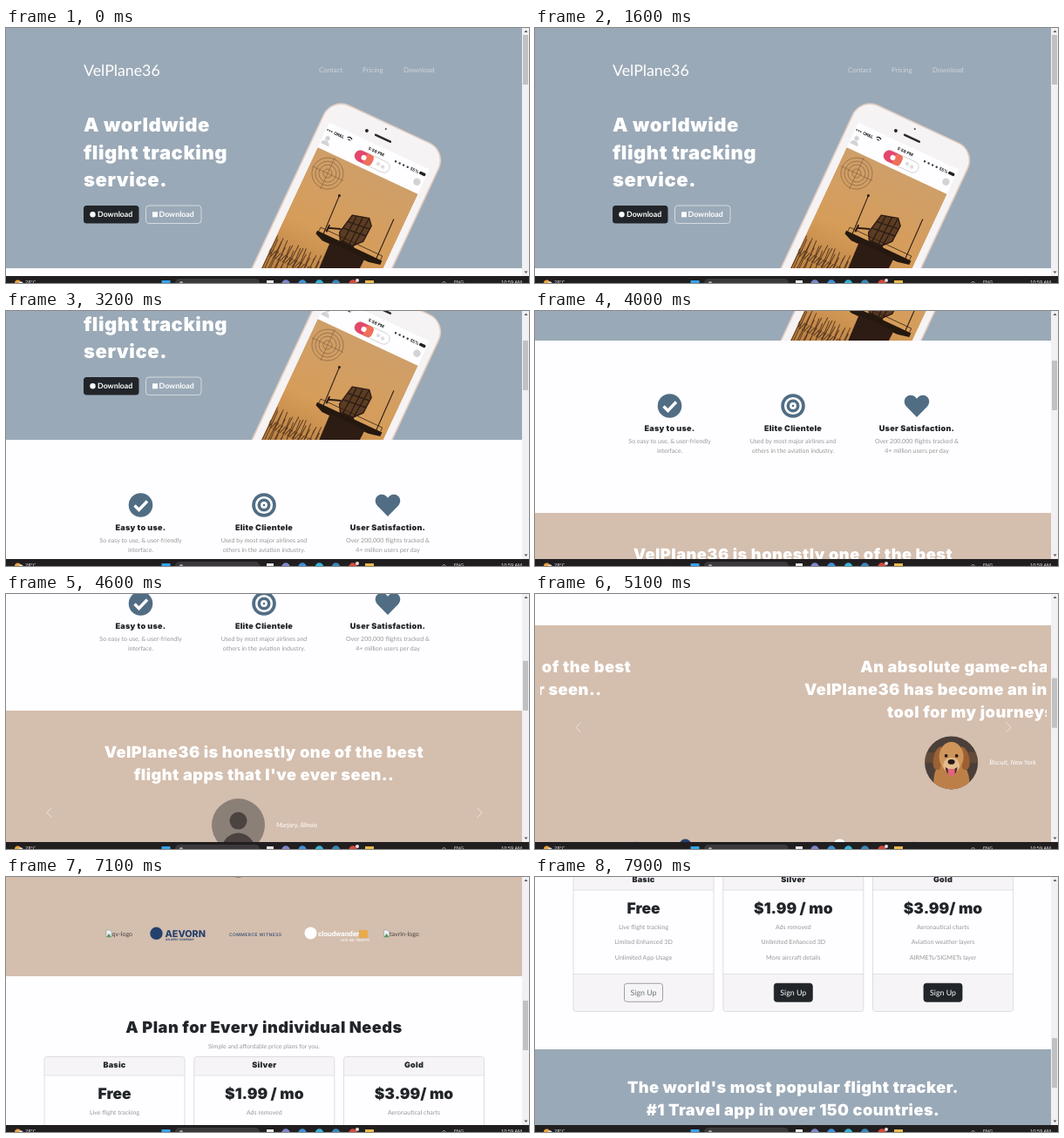
These frames come from a looping animation (600x293 px, 8 s). An HTML page:

```html
<!DOCTYPE html>
<html lang="en">
<head>
<meta charset="utf-8">
<title>Flight tracking landing page</title>
<style>
  html, body { margin: 0; width: 100%; height: 100%; overflow: hidden; background: #fefdff; }
  svg { display: block; width: 600px; height: 293px; text-rendering: geometricPrecision; }
  text { font: 7.1px Lato, sans-serif; }
  .m { text-anchor: middle; }
  .black { font-family: Inter, sans-serif; font-weight: 900; letter-spacing: .026em; }
  .hero { font-size: 22px; fill: #fff; }
  .big { font-size: 18.2px; }
  .price { font-size: 17.4px; letter-spacing: 0; }
  .sub { font-size: 9.1px; }
  .btn { font-size: 8.8px; }
  .bold { font-weight: 700; }
  .w { fill: #fff; }
  .ink { fill: #212529; }
  .grey { fill: #999; }
  .nav { font-size: 7.9px; fill: #fff; fill-opacity: .5; }
  .task { font: 5.5px "Open Sans", sans-serif; fill: #fff; }
  .status { font: 600 4.8px Inter, sans-serif; }
</style>
</head>
<body>
<svg id="stage" viewBox="0 0 600 293"></svg>
<script>
const BLUE = '#9aa9b7', BEIGE = '#d4beae', STEEL = '#516d84', NAVY = '#24406c', INK = '#212529', DARK = '#2c1c14';
const APP = 'VelPlane36';
const SLIDE_W = 580;

const text = (x, y, s, cls = '', extra = '') => `<text x="${x}" y="${y}" class="${cls}" ${extra}>${s}</text>`;
const rect = (x, y, w, h, fill, extra = '') => `<rect x="${x}" y="${y}" width="${w}" height="${h}" fill="${fill}" ${extra}/>`;
const dot = (x, y, r, fill, extra = '') => `<circle cx="${x}" cy="${y}" r="${r}" fill="${fill}" ${extra}/>`;
const path = (d, fill, extra = '') => `<path d="${d}" fill="${fill}" ${extra}/>`;
const line = (d, color, width = 1) => path(d, 'none', `stroke="${color}" stroke-width="${width}"`);
const lines = (x, y, step, list, cls) => list.map((s, i) => text(x, y + i * step, s, cls)).join('');

const defs = `<defs>
  <linearGradient id="dusk" x1="0" y1="0" x2="0" y2="1">
    <stop offset="0" stop-color="#cf9f69"/><stop offset=".5" stop-color="#d69d5a"/><stop offset="1" stop-color="#b3773a"/>
  </linearGradient>
  <clipPath id="photo"><rect x="382" y="-27" width="127" height="260"/></clipPath>
  <clipPath id="heroBox"><rect width="593" height="276"/></clipPath>
  <clipPath id="slides"><rect x="6" y="474" width="581" height="240"/></clipPath>
  <clipPath id="face"><circle r="30.5"/></clipPath>
</defs>`;

// The phone and its photo share one tilted coordinate system
function phone() {
  const body = rect(372.5, -85.5, 145.5, 330, '#f6f3f5', 'rx="22" stroke="#e2cdc1" stroke-width="1.6"')
    + rect(382, -58, 127, 32, '#fefdff')
    + dot(425, -68, 2, '#2a2a2c') + dot(444, -79, 1, '#444')
    + rect(435, -69.2, 21, 2.6, '#2a2a2c', 'rx="1.3"')
    + [384, 386.5, 389].map(x => dot(x, -50, .9, '#444')).join('')
    + text(392, -48.3, 'OR&amp;L', 'status')
    + line('M408 -51.5q3 -3 6 0M409.5 -49.5q1.5 -1.5 3 0', '#222', 1)
    + text(445, -49, '5:58 PM', 'status m')
    + [470, 475, 480, 485].map(x => dot(x, -50, 1.2, '#333')).join('')
    + text(488.5, -48.3, '55%', 'status')
    + rect(500, -51.8, 7.5, 3.4, '#222', 'rx="1"')
    + rect(424, -45, 43, 13, '#fff', 'rx="6.5" stroke="#ccc" stroke-width=".8"')
    + rect(424, -45, 22, 13, '#e4466c', 'rx="6.5"') + rect(436, -45, 10, 13, '#ef7059', 'rx="4"')
    + dot(435, -38.5, 3, '#fff')
    + dot(453, -39, 2.2, '#ddd') + dot(459, -38, 2.2, '#ddd')
    + dot(388, -41, 2.7, '#d3d3d5') + path('M383 -33a5 5 0 0 1 10 0z', '#d3d3d5')
    + dot(502, -39, 4.2, '#d3d3d5');

  const rings = [5, 10, 14, 18].map(r => dot(405, -4.5, r, 'none', 'stroke="#76573b" stroke-width=".7" stroke-opacity=".75"')).join('');
  const twigs = Array.from({ length: 22 }, (_, i) => {
    const x = 380 + i * 3, h = 46 + 10 * Math.abs(Math.sin(i * 1.9));
    return `M${x} 140l${3 * Math.sin(i * 3)} ${-h}M${x} 110l3 -9`;
  }).join('');
  const dish = 'M451 27l19 -5 6 7 -1 20 -9 10 -15 1 -5 -9z';
  const scene = rect(382, -27, 127, 170, 'url(#dusk)') + rings
    + line('M405 -24.5v40M385 -4.5h40', '#76573b', .5)
    + line(twigs, '#5b3c20', 1)
    + line('M428 13l2 48M496 11l1 50', DARK, 1.1) + dot(428, 13, 1.5, DARK)
    + line('M432 52l14 -5M432 48v9', DARK, 2)
    + path(dish, '#5b3c23')
    + line(dish + 'M449 36l27 -3M447 45l29 -3M456 26l-2 33M463 24l-1 35M470 23l-3 35', DARK, 1.4)
    + path('M453 58h14l5 6h-24z', DARK)
    + path('M422 60h82v5l-14 3h-58l-10 -4z', '#24180f')
    + line('M424 60v-5h78v5', DARK, .7)
    + path('M441 66h44l-3 80h-38z', DARK);
  return `<g clip-path="url(#heroBox)"><g transform="rotate(25)">${body}<g clip-path="url(#photo)">${scene}</g></g></g>`;
}

function hero() {
  return rect(0, 0, 593, 276, BLUE)
    + text(89, 54.5, APP, 'w', 'style="font-size:17.8px"')
    + text(359, 51, 'Contact', 'nav') + text(409, 51, 'Pricing', 'nav') + text(456, 51, 'Download', 'nav')
    + lines(89, 119, 31.5, ['A worldwide', 'flight tracking', 'service.'], 'black hero')
    + rect(89, 204, 63.5, 20.5, INK, 'rx="3.5"') + dot(99.5, 214.3, 3.2, '#fff')
    + text(105, 217.4, 'Download', 'w btn bold')
    + rect(160.5, 204, 63.5, 20.5, 'none', 'rx="3.5" stroke="#f4f6f8" stroke-width=".8" stroke-opacity=".8"') + rect(168, 211.3, 6, 6, '#fff')
    + text(175.5, 217.4, 'Download', 'w btn bold')
    + phone();
}

function features() {
  const items = [
    [154.5, 'Easy to use.', ['So easy to use, &amp; user-friendly', 'interface.']],
    [296, 'Elite Clientele', ['Used by most major airlines and', 'others in the aviation industry.']],
    [438, 'User Satisfaction.', ['Over 200,000 flights tracked &amp;', '4+ million users per day']]
  ];
  const ring = 'stroke="#fff" stroke-width="2.6"';
  return dot(154.5, 351, 13.8, STEEL) + line('M147.5 351.5l5 5 9.5 -10', '#fff', 3.4)
    + dot(296, 351, 13.8, STEEL) + dot(296, 351, 8.8, 'none', ring) + dot(296, 351, 2.6, 'none', ring)
    + path('M438 364l-12 -12.3c-5 -6 -1 -13 5 -13c3 0 5 1.5 7 4c2 -2.5 4 -4 7 -4c6 0 10 7 5 13z', STEEL)
    + items.map(([x, title, body]) => text(x, 380, title, 'black sub ink m') + lines(x, 394, 10.5, body, 'grey m')).join('');
}

function quote(id, rows, avatar, name) {
  const cy = 553 + 26.3 * rows.length;
  return `<g id="${id}">${lines(296, 527.5, 26.2, rows, 'black big w m')}
    <g transform="translate(266.5 ${cy})" clip-path="url(#face)">${avatar}</g>
    ${text(310, cy + 2, name, 'w', 'style="font-style:italic;font-size:7.5px"')}</g>`;
}

const person = dot(0, 0, 31, '#8b8078') + dot(0, -5, 10, '#4a4340') + path('M-20 31a20 22 0 0 1 40 0z', '#4a4340');
const dog = dot(0, 0, 31, '#4a4039') + rect(-31, -12, 62, 12, '#77503a', 'opacity=".6"')
  + path('M-20 31q-2 -24 8 -30h24q10 8 9 30z', '#bd7f48')
  + path('M-12 -19q-9 4 -9 21q2 9 8 5l5 -20zM12 -19q9 4 9 21q-2 9 -8 5l-5 -20z', '#9c6033')
  + '<ellipse cy="-7" rx="14" ry="17" fill="#cf965b"/><ellipse cy="3" rx="9.5" ry="9" fill="#e3bd8e"/>'
  + dot(-6, -8, 1.9, '#2a1b15') + dot(6, -8, 1.9, '#2a1b15')
  + '<ellipse cy="-1" rx="4" ry="2.8" fill="#241a18"/>'
  + path('M-7 5q7 5 14 0q-1 9 -7 9t-7 -9z', '#4a2522') + path('M-4 7h8v6q-4 6 -8 0z', '#e0667c');

const broken = (x, s) => path(`M${x} 723h4l2 2v6h-6z`, '#eef3f8', 'stroke="#8c98a5" stroke-width=".6"')
  + path(`M${x} 731l3 -4 3 4z`, '#5a9a55') + text(x + 6.5, 729.5, s, '', 'fill="#444"');

function testimonials() {
  return rect(0, 474, 593, 302, BEIGE)
    + '<g clip-path="url(#slides)">'
    + quote('first', [`${APP} is honestly one of the best`, "flight apps that I've ever seen.."], person, 'Marjory, Illinois')
    + quote('second', ['An absolute game-changer!', `${APP} has become an indispensable`, 'tool for my journeys..'], dog, 'Biscuit, New York')
    + '</g>'
    + line('M52.5 585.5l-5.5 5.7 5.5 5.7M540.5 585.5l5.5 5.7 -5.5 5.7', '#f1e8e1', .9)
    + broken(115, 'qv-logo') + broken(433.5, 'tavrin-logo')
    + dot(172.5, 726.8, 7.2, NAVY)
    + text(182.5, 730.5, 'AEVORN', '', `fill="${NAVY}" style="font:800 10.8px Inter,sans-serif"`)
    + text(183, 735, 'AN AERO COMPANY', '', `fill="${NAVY}" style="font:600 3.3px Inter,sans-serif"`)
    + text(256, 729.5, 'COMMERCE WITNESS', '', 'fill="#3f5a78" style="font:600 5px Inter,sans-serif;letter-spacing:.4px"')
    + dot(349.5, 726.5, 7, '#fff')
    + text(358, 730, 'cloudwander', 'w', 'style="font:700 8.2px Roboto,sans-serif"')
    + rect(405, 723, 10, 9, '#e9aa4c')
    + text(383.5, 735.5, 'LIVE AIR TRAFFIC', 'w', 'style="font:italic 500 4px Inter,sans-serif"');
}

function card(x, title, price, rows, outlined) {
  const mid = x + 80.5, edge = '#dcdadd';
  return rect(x, 868.5, 161, 161, '#f6f4f6', 'rx="3"') + rect(x, 890, 161, 96.5, '#fefdff')
    + line(`M${x} 890h161M${x} 986.5h161`, edge, .8)
    + rect(x, 868.5, 161, 161, 'none', `rx="3" stroke="${edge}" stroke-width=".9"`)
    + text(mid, 881, title, 'black sub ink m') + text(mid, 916.5, price, 'black price ink m')
    + lines(mid, 934.8, 17.5, rows, 'grey m')
    + rect(mid - 22, 997.3, 44, 21, outlined ? 'none' : INK, `rx="3" stroke="${outlined ? '#858b91' : INK}" stroke-width=".8"`)
    + text(mid, 1011, 'Sign Up', 'btn m', `fill="${outlined ? '#6c757d' : '#fff'}"`);
}

function pricing() {
  return text(296, 840.5, 'A Plan for Every individual Needs', 'black big ink m')
    + text(296, 859, 'Simple and affordable price plans for you.', 'grey m')
    + card(44, 'Basic', 'Free', ['Live flight tracking', 'Limited Enhanced 3D', 'Unlimited App Usage'], true)
    + card(215.8, 'Silver', '$1.99 / mo', ['Ads removed', 'Unlimited Enhanced 3D', 'More aircraft details'])
    + card(387.5, 'Gold', '$3.99/ mo', ['Aeronautical charts', 'Aviation weather layers', 'AIRMETs/SIGMETs layer'])
    + rect(0, 1073, 593, 200, BLUE)
    + lines(296, 1122.5, 26.3, ["The world's most popular flight tracker.", '#1 Travel app in over 150 countries.'], 'black big w m');
}

function chrome() {
  const icons = [[321, '#7f86c9'], [340, '#3f8fd8'], [359.5, '#35b5d6'], [378.5, '#3a86b8'], [398, '#d5473c']];
  return rect(592, 0, 8, 285, '#f1f0f2') + path('M594.5 5l2 -2.5 2 2.5z', '#555') + path('M594.5 279.5l2 2.5 2 -2.5z', '#555')
    + rect(593, 8, 6, 57, '#c1c0c2', 'id="thumb"')
    + rect(0, 285, 600, 8, '#211e20')
    + dot(13.5, 293, 3.5, '#f0a23a') + dot(17, 294, 2.7, '#d8dde2')
    + text(22, 293.5, '28°C', 'task')
    + rect(178.5, 290, 10, 5, '#35a3ea') + rect(194, 288, 97, 10, '#3b393c', 'rx="5"') + dot(201, 293, 2, '#aaa')
    + rect(299, 290, 8, 5, '#e8e8ea')
    + icons.map(([x, c]) => dot(x, 294, 4.7, c)).join('') + dot(403, 290, 2, '#e8e0df')
    + rect(412, 290, 10, 5, '#e9b949')
    + line('M500.5 293l2 -2 2 2', '#ddd', .7)
    + text(514, 294, 'ENG', 'task') + text(592, 294, '10:59 AM', 'task', 'text-anchor="end"');
}

const $ = id => document.getElementById(id);
$('stage').innerHTML = defs + rect(0, 0, 600, 293, '#fefdff')
  + `<g id="page">${features()}${testimonials()}${pricing()}${hero()}</g>` + chrome();

// [time, scroll]: the screen refreshes in steps
const steps = [[0, 0], [2400, 12], [2600, 44], [2900, 87], [3200, 128], [3400, 175], [3700, 190], [4000, 242],
  [4300, 290], [4600, 340], [4800, 390], [5100, 438], [5400, 477], [5700, 482], [6300, 527], [6500, 572],
  [6800, 617], [7100, 662], [7400, 711], [7700, 795], [7900, 875]];
const move = (id, x, y) => $(id).setAttribute('transform', `translate(${x} ${y})`);

function draw(now) {
  const t = now % 8000;
  const [time, scroll] = steps.findLast(s => s[0] <= t);
  const u = Math.min(1, Math.max(0, (time - 4745) / 600));
  const p = u * u * (3 - 2 * u);
  move('page', 0, -scroll);
  move('thumb', 0, scroll * .2025);
  move('first', -SLIDE_W * p, 0);
  move('second', SLIDE_W * (1 - p), 0);
}
const start = performance.now();
function loop() {
  draw(performance.now() - start);
  requestAnimationFrame(loop);
}
loop();
</script>
</body>
</html>
```
